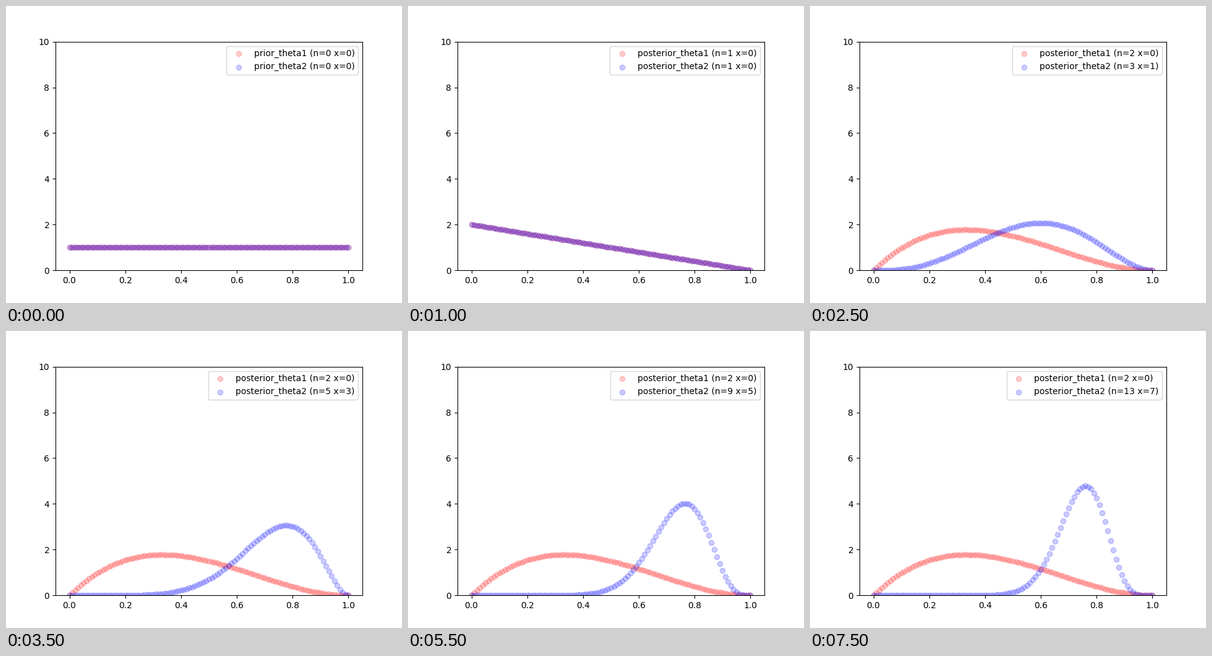
A matplotlib script for the animation above (8000 ms loop, 640 px wide and 480 px high).

```python
from math import comb

import matplotlib.pyplot as plt
import numpy as np
from matplotlib.animation import FuncAnimation

STEPS = 16
STEP_MS = 500
theta = np.linspace(0, 1, 101)

# Arm pulled at each step, and the steps on which the pull paid out.
ARMS = [1, 0, 1, 0] + [1] * 11
WINS = {5, 6, 7, 8, 9, 12, 14}


def tally(step):
    """Pulls n and successes x of both arms after the given step."""
    n, x = [0, 0], [0, 0]
    for k, arm in enumerate(ARMS[:step], start=1):
        n[arm] += 1
        x[arm] += k in WINS
    return n, x


def density(n, x):
    """Beta density over theta."""
    a, b = x + max(n - 1, 0), n - x
    total = a + b
    return (total + 1) * comb(total, a) * theta**a * (1 - theta)**b


fig, ax = plt.subplots(figsize=(6.4, 4.8), dpi=100)
ax.set_xlim(-0.05, 1.05)
ax.set_ylim(0, 10)
dots = [ax.scatter(theta, np.ones_like(theta), color=c, alpha=0.2)
        for c in ("red", "blue")]


def draw(step):
    n, x = tally(step)
    kind = "posterior" if step else "prior"
    for i, dot in enumerate(dots):
        dot.set_offsets(np.column_stack([theta, density(n[i], x[i])]))
        dot.set_label(f"{kind}_theta{i + 1} (n={n[i]} x={x[i]})")
    ax.legend(loc="upper right")
    return dots


anim = FuncAnimation(fig, draw, frames=STEPS, interval=STEP_MS,
                     init_func=lambda: draw(0), repeat=True, repeat_delay=0)
plt.show()
```
